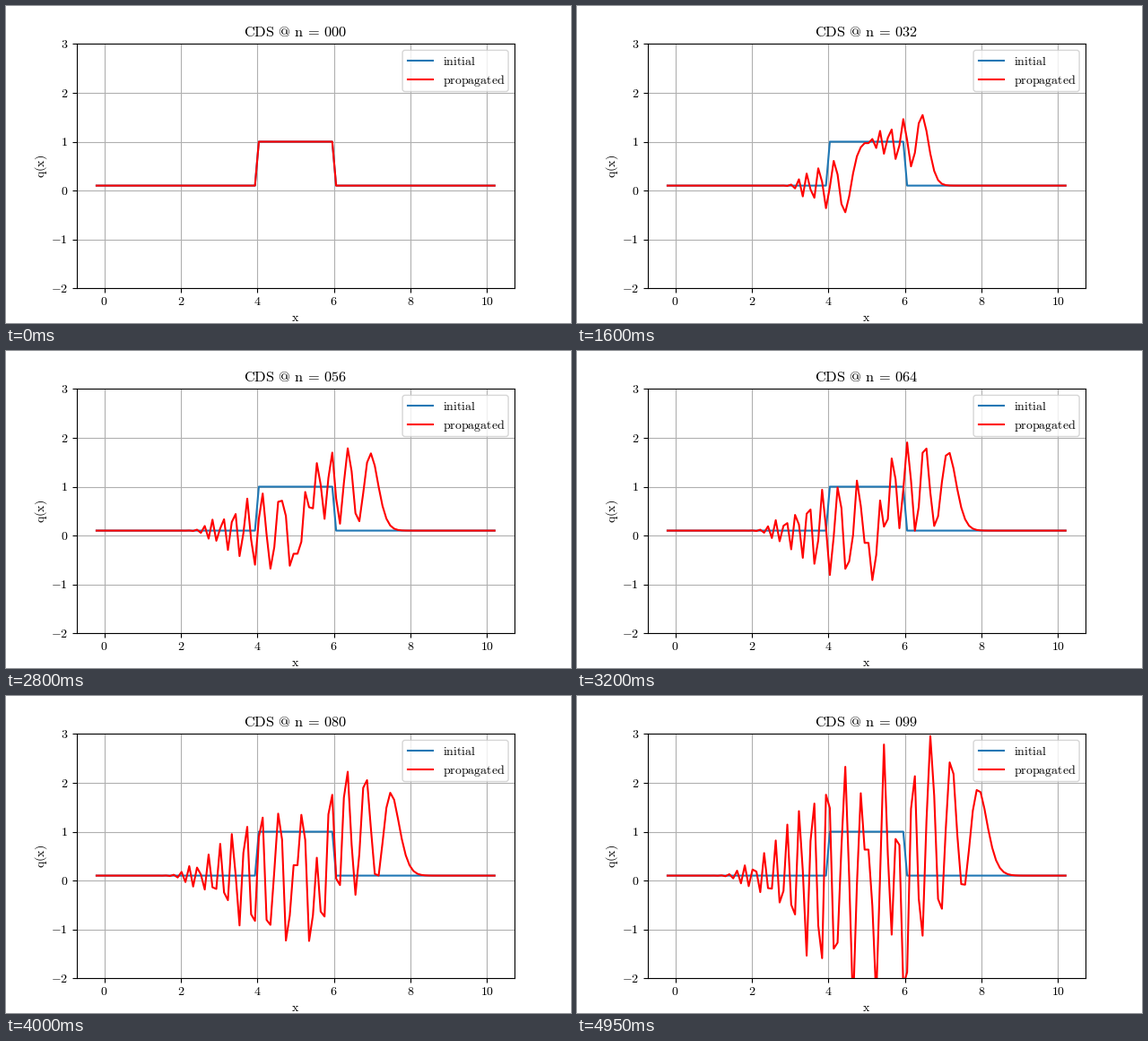
Write a matplotlib script that moves like this. It is 630 px wide and 354 px high and loops after 5 s.

```python
import numpy as np
import matplotlib.pyplot as plt
from matplotlib.animation import FuncAnimation
from matplotlib.lines import Line2D
from matplotlib.patches import FancyBboxPatch

W, H, DPI = 630, 354, 100
STEPS, INTERVAL = 100, 50
COURANT = 0.25
EM = 10 * DPI / 72  # label font size in pixels

plt.rcParams["mathtext.fontset"] = "cm"


def propagate(q):
    """One explicit Euler step of advection with central differences."""
    new = q.copy()
    new[1:-1] -= COURANT / 2 * (q[2:] - q[:-2])
    return new


# 100 grid points on [0, 10] plus two ghost cells at each end
dx = 10 / 99
x = np.arange(-2, 102) * dx
q0 = np.where((x > 4) & (x < 6), 1.0, 0.1)
history = [q0]
for _ in range(STEPS - 1):
    history.append(propagate(history[-1]))

fig = plt.figure(figsize=(W / DPI, H / DPI), dpi=DPI)
ax = fig.add_axes([0.125, 0.11, 0.775, 0.77])
ax.grid(True)
pad = 0.05 * (x[-1] - x[0])
ax.set_xlim(x[0] - pad, x[-1] + pad)
ax.set_ylim(-2, 3)
ax.set_xticks(range(0, 11, 2))
ax.set_yticks(range(-2, 4))
ax.tick_params(labelbottom=False, labelleft=False)
ax.plot(x, q0, color="C0", lw=1.5)
curve, = ax.plot(x, q0, color="red", lw=1.5)


def roman(s):
    return rf"$\mathrm{{{s}}}$"


def label(px, base, s, size=10, ha="center", rotation=0):
    """Text with its baseline at a pixel position measured from the top left."""
    return fig.text(px / W, 1 - base / H, roman(s), fontsize=size, ha=ha,
                    va="baseline", rotation=rotation, rotation_mode="anchor")


def to_pixels(u, v):
    px, py = ax.transData.transform((u, v))
    return px, H - py


for u in ax.get_xticks():
    label(to_pixels(u, 0)[0], 334.3, f"{u:.0f}")
for v in ax.get_yticks():
    label(69, to_pixels(0, v)[1] + 4.8, f"{v:.0f}", ha="right")

mid_x = 0.5125 * W
label(mid_x, 351.7, "x")
label(42.2, 178.8, "q(x)", rotation=90)


def title_text(n):
    return (r"CDS\hspace{0.38}@\hspace{0.38}n"
            rf"\hspace{{0.18}}=\hspace{{0.18}}{n:03d}")


title = label(mid_x, 34.2, title_text(0), size=11.75)

# legend
fig.add_artist(FancyBboxPatch(
    (442.1, H - 95.5), 118, 46.1, transform=None,
    boxstyle=f"round,pad=0,rounding_size={0.2 * EM}",
    fc="white", ec="0.8", lw=1, alpha=0.8))
for base, color, name in ((65.8, "C0", "initial"), (87.3, "red", "propagated")):
    y = H - base + 0.35 * EM
    fig.add_artist(Line2D([447.7, 475.5], [y, y], transform=None,
                          color=color, lw=1.5))
    label(486.6, base, name, ha="left")


def update(n):
    curve.set_ydata(history[n])
    title.set_text(roman(title_text(n)))
    return curve, title


anim = FuncAnimation(fig, update, frames=STEPS, interval=INTERVAL,
                     repeat=True, repeat_delay=0)
plt.show()
```
